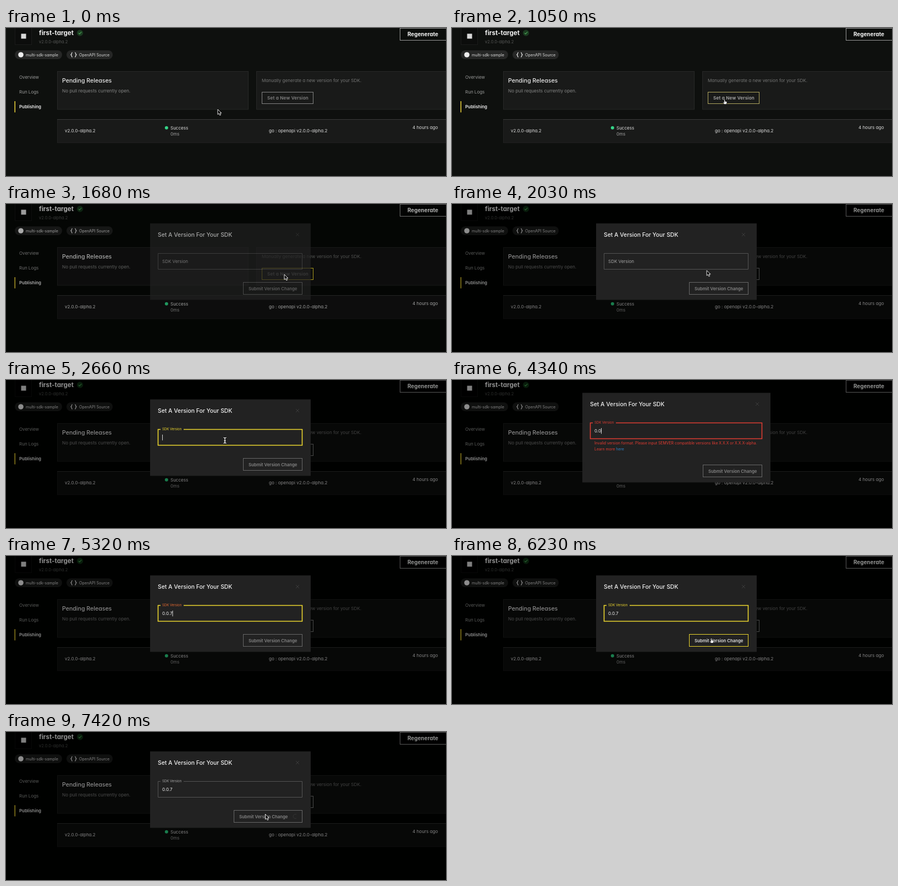
An HTML page that plays this animation: 800x271 px, repeating every 8 s.

```html
<!DOCTYPE html>
<html lang="en">
<head>
<meta charset="utf-8">
<title>Set a version</title>
<style>
html, body { margin: 0; width: 100%; height: 100%; overflow: hidden; background: #000; }
svg { display: block; width: 100vw; height: 100vh; font-family: Inter, "Open Sans", sans-serif; }
text { white-space: pre; }
#page { font-feature-settings: "cv11"; filter: url(#dim); }
</style>
</head>
<body>
<svg id="stage" viewBox="0 0 800 271"></svg>
<script>
const LOOP = 8000;
const GREY = [132, 132, 132], SOFT = [165, 165, 165], PALE = [225, 225, 225];
const YELLOW = [236, 214, 46], RED = [222, 60, 50], EDGE = [104, 104, 104], FAINT = [84, 84, 84];

// Markup helpers
const txt = (x, y, size, fill, s, weight = 400, space = 0, id = '') =>
  `<text ${id && `id="${id}"`} x="${x}" y="${y}" font-size="${size}" fill="${fill}" font-weight="${weight}" letter-spacing="${space}">${s}</text>`;
const box = (x, y, w, h, fill, stroke = 'none', extra = '') =>
  `<rect x="${x}" y="${y}" width="${w}" height="${h}" fill="${fill}" stroke="${stroke}" ${extra}/>`;
const line = (d, stroke, w = 1, extra = '') =>
  `<path d="${d}" fill="none" stroke="${stroke}" stroke-width="${w}" ${extra}/>`;

const dim = `<filter id="dim" filterUnits="userSpaceOnUse" x="0" y="0" width="800" height="271" color-interpolation-filters="sRGB">
  <feComponentTransfer>${['R', 'G', 'B'].map(c => `<feFunc${c} class="level" type="linear"/>`).join('')}</feComponentTransfer>
</filter>`;

const page = `
  ${box(0, 0, 800, 271, '#0e100e')}
  ${box(16.5, -4, 30, 34.5, '#0c0d0c', '#1a1b1a')}
  ${box(27.5, 10.5, 9, 9, '#d8d8d8')}
  ${txt(60, 13.3, 11.6, '#f2f2f2', 'first-target', 700)}
  <circle cx="134.5" cy="9" r="5.7" fill="#1b3a20"/>
  ${line('M132 9.2l1.8 1.8 3.4-3.8', '#4fae5c', 1.1)}
  ${txt(60, 28, 7.5, '#575857', 'v2.0.0-alpha.2')}
  ${box(716.5, .5, 90, 22, '#0c0e0c', '#9a9a9a')}
  ${txt(730, 15.2, 9.9, '#f6f6f6', 'Regenerate', 700)}
  ${box(16, 41, 86, 16, '#262726', 'none', 'rx="8"')}
  <circle cx="27" cy="49" r="4.8" fill="#ededed"/>
  ${txt(36, 51.8, 7.1, '#dcdcdc', 'multi-sdk-sample')}
  ${box(110, 41, 84, 16, '#262726', 'none', 'rx="8"')}
  ${line('M121 45q-1.7 0-1.7 1.6v1.2l-1.4 1.2 1.4 1.2v1.2q0 1.6 1.7 1.6M125 45q1.7 0 1.7 1.6v1.2l1.4 1.2-1.4 1.2v1.2q0 1.6-1.7 1.6', '#e4e4e4', 1.2)}
  ${txt(133, 51.8, 7.1, '#dcdcdc', 'OpenAPI Source')}
  ${txt(24, 93, 8, '#9a9b9a', 'Overview')}
  ${txt(24, 120, 8, '#9a9b9a', 'Run Logs')}
  ${txt(24, 147.3, 7.9, '#f0f0f0', 'Publishing', 600)}
  ${box(15.5, 134, 1.5, 20.5, '#f0d53a')}
  ${box(93.5, 79.5, 347, 69.5, '#191a19', '#272827')}
  ${box(455.5, 79.5, 350, 69.5, '#191a19', '#272827')}
  ${txt(102, 99.6, 10.6, '#e8e8e8', 'Pending Releases', 500)}
  ${txt(102, 118, 8.2, '#858685', 'No pull requests currently open.')}
  ${txt(465, 99, 8.1, '#747574', 'Manually generate a new version for your SDK.')}
  ${box(465.5, 117.5, 93, 21, 'none', '#8a8a8a', 'id="setEdge"')}
  ${txt(475, 131, 8.1, '#8a8a8a', 'Set a New Version', 600, .2, 'setText')}
  ${box(93.5, 167.5, 712, 42.5, '#191a19', '#222322')}
  ${line('M93 167.5H800', '#3a3b3a')}
  ${txt(107, 191.2, 8, '#dedede', 'v2.0.0-alpha.2')}
  <circle cx="291.8" cy="182.8" r="3" fill="#35d488"/>
  ${txt(299, 185.7, 8, '#dedede', 'Success')}
  ${txt(299, 197, 8, '#a2a3a2', '0ms')}
  ${txt(478, 191.2, 8.1, '#dedede', 'go : openapi v2.0.0-alpha.2')}
  ${txt(739, 185.3, 8.1, '#dedede', '4 hours ago')}`;

const modal = `
  <rect id="sheet" fill="#222"/>
  <g id="top">
    ${txt(14, 24.3, 10.4, '#f0f0f0', 'Set A Version For Your SDK', 500)}
    ${line('', 'none', 1, 'id="field"')}
    <g id="label">${txt(0, 0, 8, 'inherit', 'SDK Version')}</g>
    ${txt(22, 72.5, 8, '#f0f0f0', '', 400, 0, 'value')}
    ${box(22, 64.5, .9, 10.5, '#f0f0f0', 'none', 'id="caret"')}
    <g id="error">
      ${txt(22, 94.2, 6.9, '#e23c32', 'Invalid version format. Please input SEMVER compatible versions like X.X.X or X.X.X-alpha.')}
      ${txt(22, 105.3, 6.9, '#e23c32', 'Learn more <tspan fill="#2f80c4">here</tspan>')}
    </g>
  </g>
  ${line('M-3-3l6 6M3-3l-6 6', '#3c3c3c', 1, 'id="close"')}
  <g id="submit">
    <rect id="subEdge" x=".5" height="22" fill="none"/>
    ${txt(10, 14, 7.8, '#888', 'Submit Version Change', 600, 0, 'subText')}
    ${line('M114 7.5a4 4 0 1 0 0 7', '#343434', 1, 'id="busy"')}
  </g>`;

const beam = 'M-2.6-5.2q2.2 0 2.6 1.2 .4-1.2 2.6-1.2M0-4V4M-2.6 5.2q2.2 0 2.6-1.2 .4 1.2 2.6 1.2M-1.6.8h3.2';
const pointer = `
  <path id="arrow" d="M0 0V9.4L2.2 7.4 3.8 10.9 5.5 10.1 4 6.8H6.8Z" fill="#000" stroke="#fff" stroke-width=".9"/>
  <g id="beam">${line(beam, '#000', 2.6)}${line(beam, '#fff', 1.3)}</g>
  <path id="hand" d="M-.9 5V.6Q0-.7.9.6V3.4L3.6 4Q4.6 4.4 4.3 6L3.5 9H-.8L-3 5.6Q-2.6 4.4-.9 6Z" fill="#fff" stroke="#000" stroke-width=".7"/>`;

const stage = document.getElementById('stage');
stage.innerHTML = `${dim}<g id="page">${page}</g><g id="modal">${modal}</g><g id="cursor">${pointer}</g>`;
const levels = stage.querySelectorAll('.level');
const el = {};
stage.querySelectorAll('[id]').forEach(n => el[n.id] = n);
el.label.firstChild.removeAttribute('fill');

const set = (id, attrs) => { for (const k in attrs) el[id].setAttribute(k, attrs[k]); };
const show = (id, on) => set(id, { visibility: on ? 'inherit' : 'hidden' });

// Time helpers
const ramp = (t, from, ms) => Math.min(1, Math.max(0, (t - from) / ms));
const ease = k => k * k * (3 - 2 * k);
const mix = (a, b, k) => a.map((v, i) => v + (b[i] - v) * k);
const rgb = c => `rgb(${c.map(Math.round)})`;
const last = (list, t) => list.filter(s => s[0] <= t).pop();
// Fades through [start, colour] steps, 200 ms each
const fade = (t, steps) => rgb(steps.reduce((c, [at, to]) => mix(c, to, ease(ramp(t, at, 200))), steps[0][1]));

const OPEN = 1540, FOCUS = 2450, BAD = 3150, GOOD = 5250, HOVER = 5980, SEND = 6790;
const keys = [[0, ''], [FOCUS, ''], [BAD, '0'], [4110, '0.'], [4180, '0.0'], [4740, '0.0.'], [GOOD, '0.0.7']];
const moves = [[420, 770, 385, 149, 506, 129], [1820, 490, 506, 129, 398, 110.5], [5390, 640, 398, 110.5, 471.5, 150.5]];

function drawPage(t) {
  const k = ease(ramp(t, OPEN, 225));
  levels.forEach(n => {
    n.setAttribute('slope', 1 - .37 * k);
    n.setAttribute('intercept', -.032 * k);
  });
  set('setEdge', { stroke: fade(t, [[0, GREY], [960, YELLOW], [1820, GREY]]) });
  set('setText', { fill: fade(t, [[0, GREY], [960, PALE], [OPEN, GREY]]) });
}

function drawModal(t) {
  const bad = t >= BAD && t < GOOD, focus = t >= FOCUS && t < SEND, sent = t >= SEND;
  const [x, y, w, h] = bad ? [237, 23.5, 342, 164] : [262, 35.5, 292, 140];
  set('modal', { opacity: ease(ramp(t, OPEN, 225)) });
  set('sheet', { x, y, width: w, height: h });
  set('top', { transform: `translate(${x} ${y})` });
  set('close', { transform: `translate(${x + w - 24} ${y + 20.5})` });

  const k = ease(ramp(t, FOCUS, 200)), gap = 19 + 42 * k;
  set('field', {
    d: `M${gap} 55H${w - 15.5}V84H14.5V55H19`,
    stroke: rgb(bad ? RED : focus ? YELLOW : FAINT), 'stroke-width': focus ? 1.6 : 1
  });
  set('label', {
    transform: `translate(22 ${72.5 - 15.7 * k}) scale(${1 - .25 * k})`,
    fill: fade(t, [[0, SOFT], [FOCUS, YELLOW], [BAD, RED], [GOOD, YELLOW], [SEND, SOFT]])
  });

  const [at, text] = last(keys, t);
  el.value.textContent = text;
  set('caret', { x: 22 + (text ? el.value.getComputedTextLength() : 0) });
  show('caret', focus && Math.floor((t - at) / 500) % 2 === 0);
  show('error', bad);

  const bw = sent ? 125 : 108;
  set('submit', { transform: `translate(${x + w - 15 - bw} ${y + h - 32})` });
  set('subEdge', { width: bw - 1, stroke: fade(t, [[0, EDGE], [HOVER, YELLOW], [SEND, EDGE]]) });
  set('subText', { fill: fade(t, [[0, GREY], [HOVER, PALE], [SEND, GREY]]) });
  show('busy', sent);
}

function drawCursor(t) {
  const [at, ms, x0, y0, x1, y1] = last(moves, t) || moves[0];
  const k = ease(ramp(t, at, ms)), x = x0 + (x1 - x0) * k, y = y0 + (y1 - y0) * k;
  const hand = t < OPEN ? x > 465 && y < 139 : y > 144 && t > GOOD && t < SEND;
  const text = t > 1820 && x < 539 && y > 90 && y < 120.5;
  set('cursor', { transform: `translate(${x} ${y})` });
  show('cursor', t < BAD || t >= moves[2][0]);
  show('hand', hand);
  show('beam', text);
  show('arrow', !hand && !text);
}

function tick() {
  const t = performance.now() % LOOP;
  drawPage(t);
  drawModal(t);
  drawCursor(t);
  requestAnimationFrame(tick);
}
tick();
</script>
</body>
</html>
```
